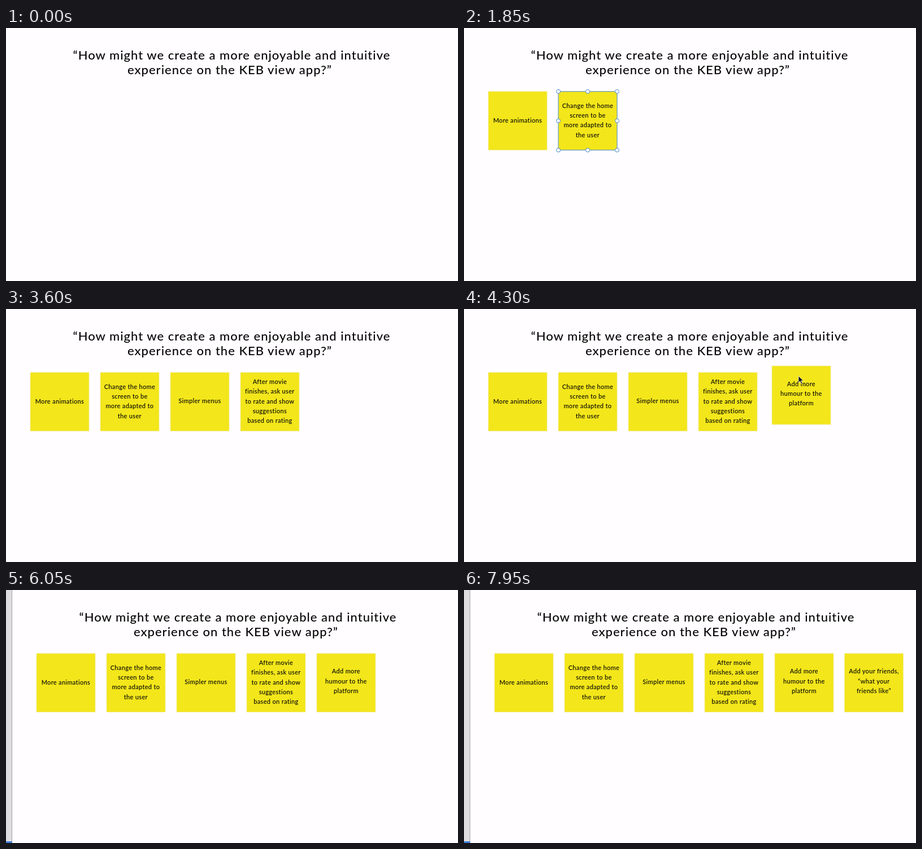
Recreate the animation shown at these times as an HTML page. Size 800x449 px, loop 8000 ms.

```html
<!DOCTYPE html>
<html lang="en">
<head>
<meta charset="utf-8">
<title>Idea board</title>
<style>
  html, body { margin: 0; width: 100%; height: 100%; overflow: hidden; background: #fffdff; }
  svg { display: block; width: 100vw; height: 100vh; }
  text { font-family: Lato, "Open Sans", sans-serif; font-weight: 500; fill: #050505; text-anchor: middle; }
  .title { font-size: 22px; letter-spacing: 1px; }
  .idea { font-size: 11px; letter-spacing: .33px; }
  .tag { font-size: 9px; font-weight: 700; letter-spacing: .3px; fill: #c65bd0; text-anchor: end; }
</style>
</head>
<body>
<svg id="stage" viewBox="0 0 800 449" preserveAspectRatio="none"></svg>
<script>
const NS = 'http://www.w3.org/2000/svg';
const LOOP = 8000, SIZE = 104, TOP = 112.7, LEADING = 17.3;
const PINK = '#c668d2', BLUE = '#72bfe2', GREEN = '#8be08c';
const stage = document.getElementById('stage');

function add(parent, tag, attrs = {}, text) {
  const el = document.createElementNS(NS, tag);
  for (const k in attrs) el.setAttribute(k, attrs[k]);
  if (text) el.textContent = text;
  parent.appendChild(el);
  return el;
}
const line = (parent, x1, y1, x2, y2, stroke, width = 1.3) =>
  add(parent, 'line', { x1, y1, x2, y2, stroke, 'stroke-width': width });
const show = (el, on) => el.setAttribute('visibility', on ? 'visible' : 'hidden');
const move = (el, x, y) => el.setAttribute('transform', `translate(${x.toFixed(2)} ${y.toFixed(2)})`);

// path: [time, x, y]; grip: cursor tip inside the note; until: end of selection
const ideas = [
  { lines: ['More animations'], dy: 0, grip: [60, 18], until: 1050,
    path: [[250, 330, 455], [500, 180, 250], [700, 22, 125], [850, 43, TOP]] },
  { lines: ['Change the home', 'screen to be', 'more adapted to', 'the user'], dy: 0, grip: [60, 18], until: 1950,
    path: [[1200, 330, 455], [1500, 230, 220], [1650, 165, 120], [1750, 167, TOP]] },
  { lines: ['Simpler menus'], dy: -1, grip: [60, 18], until: 2560,
    path: [[2050, 400, 455], [2300, 330, 220], [2420, 294, 125], [2500, 291, TOP]] },
  { lines: ['After movie', 'finishes, ask user', 'to rate and show', 'suggestions', 'based on rating'], dy: 0, grip: [71, 15], until: 3350,
    path: [[2560, 520, 455], [2800, 470, 230], [2950, 432, 145.7], [3150, 415, TOP]] },
  { lines: ['Add more', 'humour to the', 'platform'], dy: -2, grip: [47, 18], until: 4950,
    path: [[3800, 420, 455], [4150, 475, 161], [4300, 545, 101], [4450, 539, TOP]] },
  { lines: ['Add your friends,', '“what your', 'friends like”'], dy: -2, grip: [76, 40], until: 7750,
    path: [[6300, 600, 455], [6650, 635, 240], [6900, 654, 104.7], [7150, 662.5, TOP]] }
];

// Cubic curve through the path points, flat where the direction turns
function along(path, t, axis) {
  const last = path.length - 1;
  if (t >= path[last][0]) return path[last][axis];
  const slope = i => {
    if (i === 0 || i === last) return 0;
    const [a, b, c] = [path[i - 1], path[i], path[i + 1]];
    if ((b[axis] - a[axis]) * (c[axis] - b[axis]) <= 0) return 0;
    return (c[axis] - a[axis]) / (c[0] - a[0]);
  };
  let i = 0;
  while (t >= path[i + 1][0]) i++;
  const p = path[i], q = path[i + 1], d = q[0] - p[0], u = (t - p[0]) / d;
  const v = 1 - u;
  return p[axis] * (1 + 2 * u) * v * v + slope(i) * d * u * v * v
    + q[axis] * u * u * (3 - 2 * u) - slope(i + 1) * d * u * u * v;
}

add(stage, 'rect', { width: 800, height: 449, fill: '#fffdff' });
const world = add(stage, 'g');
add(world, 'rect', { x: -31, width: 30.5, height: 449, fill: '#dedcde' });
const edge = line(world, -.5, 0, -.5, 449, '#a5a3a6', 1);
add(world, 'text', { x: 399.5, y: 55.6, class: 'title' }, '“How might we create a more enjoyable and intuitive');
add(world, 'text', { x: 396, y: 81.5, class: 'title' }, 'experience on the KEB view app?”');

for (const idea of ideas) {
  const g = idea.el = add(world, 'g');
  add(g, 'rect', { width: SIZE, height: SIZE, fill: '#f3e61a', stroke: '#f3eca0', 'stroke-width': .8 });
  idea.lines.forEach((s, i) => add(g, 'text', {
    x: SIZE / 2 - .1, class: 'idea',
    y: 55.1 + idea.dy + (i - (idea.lines.length - 1) / 2) * LEADING
  }, s));
}

const frame = add(world, 'g', { fill: 'none', stroke: '#4685c4', 'stroke-width': 1 });
add(frame, 'rect', { width: SIZE, height: SIZE });
for (let i = 0; i < 9; i++) {
  if (i !== 4) add(frame, 'circle', { cx: i % 3 * SIZE / 2, cy: Math.floor(i / 3) * SIZE / 2, r: 3.5, fill: '#fff' });
}

const guides = [];
function guide(from, to) {
  const el = add(stage, 'g');
  guides.push({ el, from, to });
  return el;
}
line(guide(1650, 1740), 0, 112.7, 800, 112.7, BLUE, 1);
line(guide(2430, 2490), 395, 0, 395, 449, BLUE, 1);

let g = guide(2900, 3000);
line(g, 535.2, 145.7, 535.2, 249.5, '#8fe3b5');
line(g, 535.2, 249.5, 535.2, 449, PINK);
add(g, 'text', { x: 531, y: 377, class: 'tag' }, '599');

g = guide(5400, 5550);
line(g, 10.7, 0, 10.7, 449, '#b878c4');
add(g, 'text', { x: 6.5, y: 237, class: 'tag' }, '1121');

g = guide(6850, 6950);
line(g, 716.8, 104.7, 716.8, 208.5, GREEN);
line(g, 716.8, 208.5, 716.8, 449, '#b36fc9');
line(g, 768.8, 104.7, 768.8, 449, BLUE);
add(g, 'text', { x: 712.5, y: 353, class: 'tag' }, '677');

const bar = add(stage, 'rect', { y: 446, width: 11, height: 3, fill: '#3f7fd6' });
const cursor = add(stage, 'path', {
  d: 'M0 0V11.5L2.7 9 4.7 13.3 6.7 12.4 4.8 8.2H8.6Z',
  fill: '#111', stroke: '#fff', 'stroke-width': .7, 'stroke-linejoin': 'round'
});

function draw(t) {
  const u = Math.min(1, Math.max(0, (t - 5200) / 180));
  const pan = 11 * u * u * (3 - 2 * u);
  move(world, pan, 0);

  let held = false, picked = false;
  for (const { el, path, grip, until } of ideas) {
    const start = path[0][0], drop = path[path.length - 1][0];
    show(el, t >= start);
    if (t < start) continue;
    const x = along(path, t, 1), y = along(path, t, 2);
    move(el, x, y);
    if (t < drop) {
      held = true;
      move(cursor, x + pan + grip[0], y + grip[1]);
    } else if (t < until) {
      picked = true;
      move(frame, x, y);
    }
  }
  show(cursor, held);
  show(frame, picked);
  show(bar, t >= 6000);
  show(edge, pan > 0);
  for (const { el, from, to } of guides) show(el, t >= from && t < to);
}

const begin = performance.now();
function tick() {
  draw((performance.now() - begin) % LOOP);
  requestAnimationFrame(tick);
}
draw(0);
requestAnimationFrame(tick);
</script>
</body>
</html>
```
